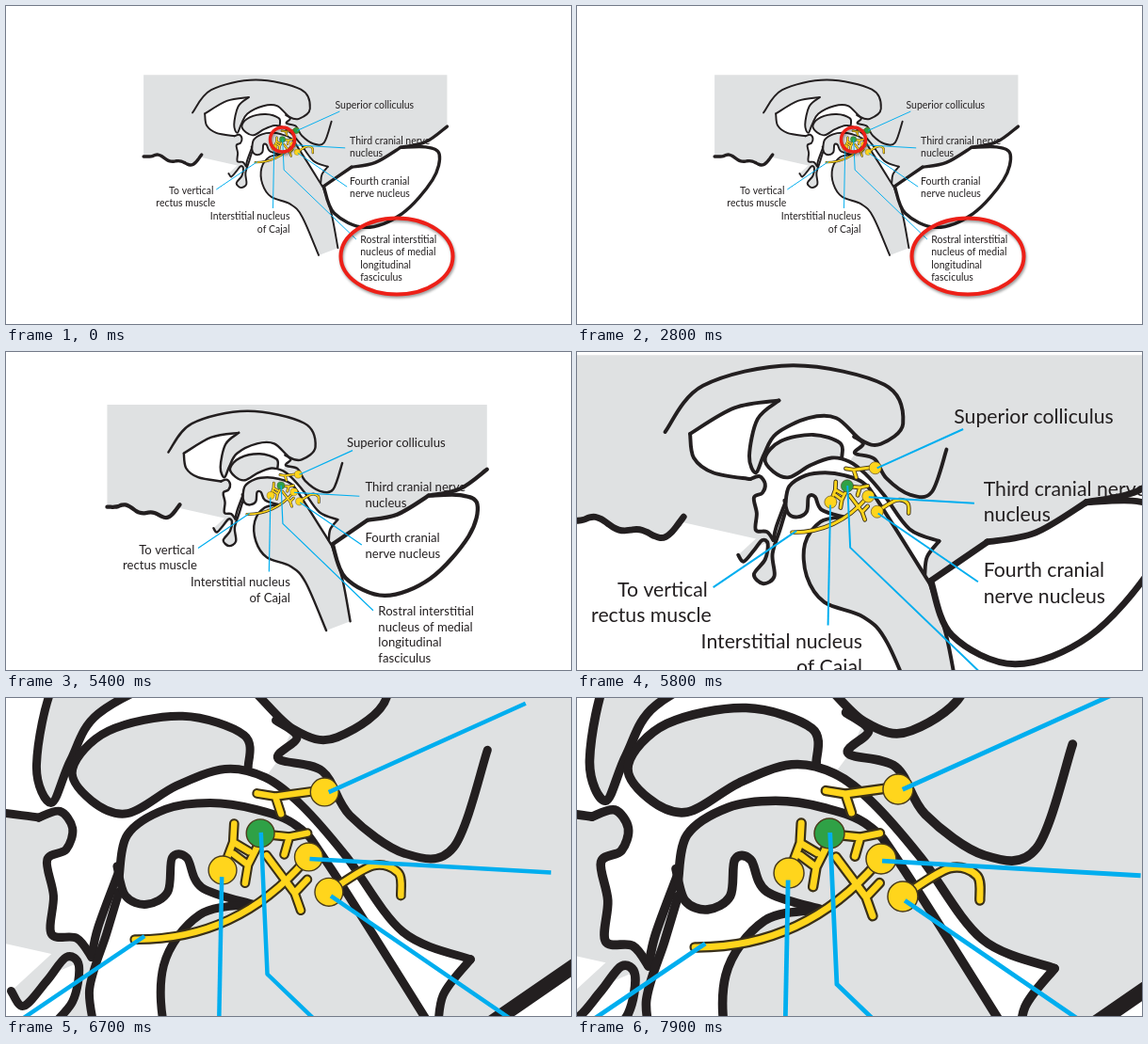
These frames come from a looping animation (600 px wide and 338 px high, 8000 ms). An HTML page with a canvas:

```html
<!DOCTYPE html>
<html lang="en">
<head>
<meta charset="utf-8">
<title>Midbrain nuclei</title>
<style>
html, body { margin: 0; width: 100%; height: 100%; overflow: hidden; background: #fff; }
canvas { display: block; width: 600px; height: 338px; }
</style>
</head>
<body>
<canvas id="stage" width="600" height="338"></canvas>
<script>
const ctx = document.getElementById('stage').getContext('2d');
const INK = '#231f20', GRAY = '#dfe1e2', YELLOW = '#ffd51c', GREEN = '#2fa146';
const BLUE = '#00aeef', RED = '#ed2018';
const LOOP = 8000, STEP = 100;
const BASE = 2.06;        // anatomy is laid out at this zoom
const CELL_ZOOM = 2.41;   // neurons are laid out enlarged again by this

// Adds a Catmull-Rom curve through flat x, y pairs.
function curve(path, p, join) {
  const n = p.length / 2;
  const at = i => { const k = 2 * Math.max(0, Math.min(n - 1, i)); return [p[k], p[k + 1]]; };
  if (join) path.lineTo(p[0], p[1]); else path.moveTo(p[0], p[1]);
  for (let i = 0; i < n - 1; i++) {
    const a = at(i - 1), b = at(i), c = at(i + 1), d = at(i + 2);
    path.bezierCurveTo(b[0] + (c[0] - a[0]) / 6, b[1] + (c[1] - a[1]) / 6,
      c[0] - (d[0] - b[0]) / 6, c[1] - (d[1] - b[1]) / 6, c[0], c[1]);
  }
  return path;
}

const line = p => curve(new Path2D(), p);
const flip = p => p.map((_, i) => p[p.length - 2 - i + 2 * (i % 2)]);

function region(...parts) {
  const path = new Path2D();
  parts.forEach((p, i) => curve(path, p, i > 0));
  path.closePath();
  return path;
}

// The wavy lower edge of the frontal lobe.
const base = [];
for (let x = -17; x <= 110; x += 6.35) {
  const u = Math.max(0, x / 110);
  base.push(x, 179 + 17 * Math.sin(Math.PI * u * u) + 4 * Math.cos(13.7 * (u - 0.36)));
}

// Key points of the outlines
const callosum = [90, 84, 131, 34, 228, 12, 327, 33, 347, 75, 323, 97, 302, 93, 275, 69,
  245, 69, 210, 86, 197, 108, 188, 128, 181, 110, 190, 70, 213, 50];
const hornTop = [117, 86, 165, 58, 213, 50];
const hornLow = [117, 86, 121, 112, 142, 128, 182, 135];
const front = [182, 135, 192, 132, 198, 140, 195, 150, 186, 155, 189, 172, 188, 190, 200, 192, 207, 201];
const stalk = [207, 201, 210, 187, 220, 160];
const pouch = [169, 217, 175, 224, 186, 212, 195, 201, 201, 205, 198, 222, 186, 238, 196, 248,
  208, 240, 206, 216, 214, 190, 220, 170];
const roof = [281, 111, 279, 96, 250, 87, 215, 94, 198, 112, 207, 127, 224, 133, 247, 120,
  270, 112, 289, 116, 306, 129, 327, 153, 354, 189, 386, 202];
const flap = [386, 202, 373, 219, 370.5, 238];
const floorLine = [220, 163, 224, 143, 242, 131, 263, 128, 284, 131, 304, 139, 320, 159, 376, 248];
const hook = [219, 158, 223, 172, 233, 176, 243, 170, 245, 154, 252, 154, 259, 168, 283, 176];
const pons = [283, 176, 258, 181, 241, 205, 243, 240, 262, 268, 304, 284, 330, 312, 366, 396];
const dorsal = [376, 248, 394, 305, 408, 380];
const colliculi = [294, 89, 304, 97, 295, 107, 316, 113, 329, 134, 355, 152, 378, 149, 394, 103];
const tent = [647, 114, 600, 148, 545, 160];
const cortex = [545, 160, 490, 193, 438, 203];
const lobeTop = [438, 203, 377, 245];
const lobeRim = [377, 245, 400, 304, 468, 335, 548, 305, 615, 231, 630, 175, 600, 159, 545, 160];

const grayAreas = [
  region([-17, 1, 647, 1], tent, cortex, lobeTop, dorsal, flip(pons), flip(hook), flip(stalk),
    pouch.slice(0, 8), [110, 182], flip(base)),
  region(pouch)
];
const whiteAreas = [
  region(hornTop, flip(callosum.slice(22)), flip(hornLow)),
  region(flip(callosum.slice(12, 24)), [295, 108], roof.slice(18), flap,
    flip(floorLine), flip(stalk), flip(front)),
  region(lobeTop, lobeRim, cortex)
];
const thalamus = region(roof.slice(0, 18));
const thin = [callosum, hornTop, hornLow, front, stalk, pouch, roof, flap,
  floorLine, hook, pons, dorsal, colliculi].map(line);
const thick = [base, tent, cortex, lobeTop, lobeRim].map(line);

// A stem that splits: one prong runs nearly straight on, one turns aside.
function fork(x, y, jx, jy, side) {
  const path = line([x, y, jx, jy]);
  const dir = Math.atan2(jy - y, jx - x);
  for (const turn of [-0.3, 1.75]) {
    const a = dir + turn * side;
    path.moveTo(jx, jy);
    path.lineTo(jx + 21 * Math.cos(a), jy + 21 * Math.sin(a));
  }
  return path;
}

const axon = new Path2D('M318 174Q240 265 124 264');
const fibres = [
  fork(328, 95, 284, 101, -1),
  fork(226, 180, 236, 153, 1),
  fork(265, 155, 253, 179, 1),
  fork(280, 145, 300, 147, 1),
  fork(274, 168, 306, 211, -1),
  axon,
  line([349, 207, 395, 180, 424, 188, 427, 214])
];

const pointers = [
  [319, 123, 412, 81], [310, 154.5, 424, 161], [320, 172, 428, 246],
  [287, 142, 290, 209, 448, 361], [268.5, 163, 266, 293], [232, 191, 142, 252]
];

const labels = [
  ['left', 402, 75, 'Superior colliculus'],
  ['left', 434, 153, 'Third cranial nerve', 'nucleus'],
  ['left', 434, 241, 'Fourth cranial', 'nerve nucleus'],
  ['right', 136, 262, 'To vertical'],
  ['right', 140, 289, 'rectus muscle'],
  ['right', 303, 318, 'Interstitial nucleus', 'of Cajal'],
  ['left', 457, 369, 'Rostral interstitial', 'nucleus of medial', 'longitudinal', 'fasciculus']
];

function zoomAbout(x, y, k) {
  ctx.translate(x, y);
  ctx.scale(k, k);
  ctx.translate(-x, -y);
}

function fillAll(paths, color) {
  ctx.fillStyle = color;
  paths.forEach(p => ctx.fill(p));
}

function strokeAll(paths, width, color) {
  ctx.lineWidth = width;
  ctx.strokeStyle = color;
  paths.forEach(p => ctx.stroke(p));
}

function cell(x, y, color, alpha = 1) {
  const disc = new Path2D();
  disc.arc(x, y, 16, 0, Math.PI * 2);
  ctx.globalAlpha = alpha;
  fillAll([disc], color);
  strokeAll([disc], 1.5, '#4a3c1c');
  ctx.globalAlpha = 1;
}

function drawCells(mark) {
  ctx.save();
  zoomAbout(300.7, 142, 1 / CELL_ZOOM);
  strokeAll(fibres, 11.5, '#3a3018');
  strokeAll(fibres, 7, YELLOW);
  cell(340, 96, YELLOW);
  cell(340, 96, GREEN, mark);
  cell(224, 185, YELLOW);
  cell(322, 170, YELLOW);
  cell(345, 210, YELLOW);
  cell(267, 143, GREEN);
  ctx.restore();
}

function drawLabels() {
  ctx.font = '21.6px Lato, "Open Sans", sans-serif';
  ctx.fillStyle = INK;
  for (const [align, x, y, ...rows] of labels) {
    ctx.textAlign = align;
    rows.forEach((row, i) => ctx.fillText(row, x, y + i * 27.8));
  }
}

function drawRing(x, y, rx, ry, width, alpha) {
  ctx.save();
  ctx.globalAlpha = alpha;
  ctx.shadowColor = 'rgba(0,0,0,.4)';
  ctx.shadowBlur = 3;
  ctx.shadowOffsetX = 1;
  ctx.shadowOffsetY = 2;
  const ring = new Path2D();
  ring.ellipse(x, y, rx, ry, 0, 0, Math.PI * 2);
  strokeAll([ring], width, RED);
  ctx.restore();
}

const clamp = v => Math.max(0, Math.min(1, v));

function ease(u) {
  const half = v => Math.pow(2 * v, 2.5) / 2;
  return u < 0.5 ? half(u) : 1 - half(1 - u);
}

function draw(t) {
  const zoom = 1 + 3.96 * ease(clamp((t - 4870) / 2420));
  const rings = 1 - clamp((t - 4700) / 400);
  ctx.fillStyle = '#fff';
  ctx.fillRect(0, 0, 600, 338);
  ctx.save();
  zoomAbout(300, 141.3, zoom / BASE);
  ctx.lineCap = ctx.lineJoin = 'round';
  fillAll(grayAreas, GRAY);
  fillAll(whiteAreas, '#fff');
  fillAll([thalamus], GRAY);
  strokeAll(thin, 4, INK);
  strokeAll(thick, 7, INK);
  drawCells(rings);

  ctx.lineCap = 'butt';
  ctx.lineWidth = 2;
  ctx.strokeStyle = BLUE;
  for (const p of pointers) {
    ctx.beginPath();
    for (let i = 0; i < p.length; i += 2) ctx.lineTo(p[i], p[i + 1]);
    ctx.stroke();
  }
  drawLabels();
  ctx.restore();
  drawRing(293.5, 142, 13, 13, 3.4, rings);
  drawRing(415, 266, 59.5, 40.5, 4, rings);
}

const start = performance.now();
function tick() {
  const t = (performance.now() - start) % LOOP;
  draw(Math.floor(t / STEP) * STEP);
  requestAnimationFrame(tick);
}
tick();
</script>
</body>
</html>
```
